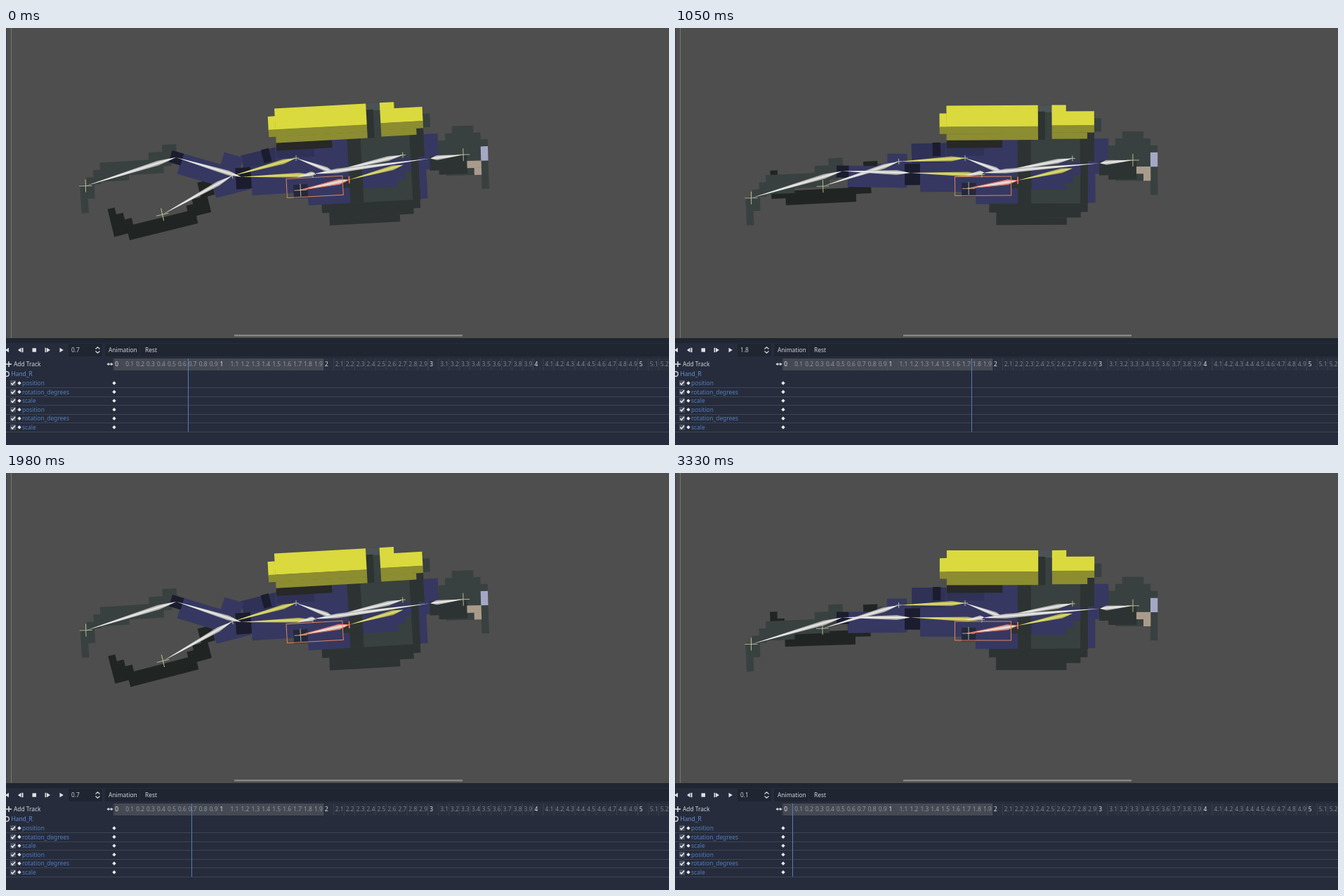
These frames come from a looping animation (944 px wide and 593 px high, 3360 ms). An HTML page with a canvas:

```html
<!DOCTYPE html>
<html lang="en">
<head>
<meta charset="utf-8">
<title>Skeleton animation editor</title>
<style>
html, body { margin: 0; width: 100%; height: 100%; overflow: hidden; background: #4d4e4d; }
canvas { display: block; width: 944px; height: 593px; }
</style>
</head>
<body>
<canvas id="stage" width="944" height="593"></canvas>
<script>
const g = document.getElementById('stage').getContext('2d');
const LOOP = 3360, RAD = Math.PI / 180, CELL = 10;
const FONT = '"Noto Sans", "Open Sans", sans-serif';
const C = {
  bg: '#4d4e4d', purple: '#363861', dusk: '#2f3156', night: '#1b1c2e',
  slate: '#38413f', dark: '#2d3332', black: '#202423', lime: '#dada3e',
  olive: '#8c8c31', skin: '#a99b8c', lilac: '#a5a8c4',
  panel: '#262c3b', deep: '#1f2531', blue: '#547cc0', icon: '#e0e1e4'
};

function rect(color, x0, y0, x1, y1) {
  g.fillStyle = color;
  g.fillRect(x0, y0, x1 - x0, y1 - y0);
}

// A block of sprite pixels, in cells; the small bleed hides seams when turned.
function box(color, x, y, w, h) {
  g.fillStyle = color;
  g.fillRect(x * CELL, y * CELL, w * CELL + 0.3, h * CELL + 0.3);
}

function path(...p) {
  g.beginPath();
  for (let i = 0; i < p.length; i += 2) g.lineTo(p[i], p[i + 1]);
}

function fill(color, ...p) {
  path(...p);
  g.fillStyle = color;
  g.fill();
}

function line(color, w, ...p) {
  path(...p);
  g.strokeStyle = color;
  g.lineWidth = w;
  g.stroke();
}

function text(s, x, y, color) {
  g.font = '8.4px ' + FONT;
  g.fillStyle = color;
  g.fillText(s, x, y + 3);
}

// Draws a part around a joint; ox, oy shift its grid in cells.
function place([x, y], deg, draw, ox = 0, oy = 0) {
  g.save();
  g.translate(x, y);
  g.rotate(deg * RAD);
  g.translate(ox * CELL, oy * CELL);
  draw();
  g.restore();
}

// Limb angles are measured downwards from the leftward direction.
function reach([x, y], len, deg) {
  return [x - len * Math.cos(deg * RAD), y + len * Math.sin(deg * RAD)];
}

// Kite with its widest point a fifth along, bright spine and shaded sides.
function bone(a, b, mid = '#efefed', side = '#91918f', outline) {
  const dx = b[0] - a[0], dy = b[1] - a[1], len = Math.hypot(dx, dy), half = 3.5;
  g.save();
  g.translate(a[0], a[1]);
  g.rotate(Math.atan2(dy, dx));
  const shade = g.createLinearGradient(0, -half, 0, half);
  shade.addColorStop(0, side);
  shade.addColorStop(0.5, mid);
  shade.addColorStop(1, side);
  fill(shade, 0, 0, len / 5, -half, len, 0, len / 5, half);
  if (outline) {
    g.closePath();
    g.strokeStyle = outline;
    g.lineWidth = 1;
    g.stroke();
  }
  g.restore();
}

const yellowBone = (a, b) => bone(a, b, '#e2e070', '#97954c');

function cross(p, deg, r) {
  place(p, deg, () => {
    line('#d6c8a8', 0.8, -r, 0, r, 0);
    line('#cfd9a8', 0.8, 0, -r, 0, r);
  });
}

function rightShin() {
  for (let i = 0; i < 3; i++) box(C.black, i, i, 1, 4 - i);
  box(C.black, 2, 3, 10, 2);
  box(C.black, 11, 2.2, 1, 2);
  box(C.black, 12, 1.5, 2.2, 2.4);
  box(C.black, 13.3, -0.6, 2, 2.2);
  box(C.purple, 15.4, -0.2, 5, 2.3);
}

function rightThigh() {
  box(C.dusk, -7.6, -2.2, 5, 4.2);
  box(C.dusk, -2.8, -1.5, 2.8, 3.5);
  box(C.night, -4.6, -2.3, 1.1, 1.9);
}

function leftFoot() {
  for (let i = 0; i < 3; i++) box(C.slate, -12 - i, 3 + i, 1, 2 + i);
  box(C.slate, -11, 2, 4, 2.7);
  box(C.slate, -7, 2, 5, 2);
  box(C.slate, -4, 1, 3.2, 2);
  box(C.slate, -2, 0, 2, 2);
}

function leftShin() {
  box(C.purple, 0.8, -0.8, 8.4, 3);
  box(C.purple, 6.4, -2.6, 2.8, 3);
  box(C.night, -0.8, -0.8, 1.7, 1.7);
}

function leftThigh() {
  box(C.night, -11, -1.6, 2.2, 3);
  box(C.purple, -8.8, -1.7, 9, 4.1);
}

function torso() {
  box(C.purple, 0.8, 5.5, 10.5, 4.7);
  box(C.purple, 8.9, 4.8, 2.4, 2.5);
  box(C.dusk, 1, 5.8, 5.3, 1.3);
  box(C.purple, 5.1, 10, 6.2, 4);
  // vest
  box(C.dark, 11.1, 4.8, 2, 9.2);
  box(C.slate, 13, 4.7, 7.1, 9.3);
  box(C.dark, 20, 3.9, 2, 4.2);
  box(C.dark, 20, 8, 1.1, 6);
  box(C.purple, 22, 4.8, 2, 5);
  box(C.purple, 21.1, 8, 1, 5.9);
  box(C.dark, 7, 14, 14, 1.2);
  box(C.dark, 8, 15, 12, 1);
  box(C.dark, 8, 16, 10, 1);
  // tank
  box('#272827', 1, 4.9, 7.9, 1.1);
  box(C.slate, 14, 0, 2, 4.9);
  box('#4b5355', 14, 0, 2, 1);
  box(C.dark, 14, 0.9, 1, 4);
  box(C.slate, 22, 1.9, 1, 1.9);
  box(C.lime, 1, 0, 13, 3);
  box(C.lime, 0, 1.1, 1, 2);
  box(C.olive, 0, 3, 14, 1);
  box(C.olive, 1, 4, 13, 0.9);
  box(C.lime, 16, 0, 2, 1);
  box(C.lime, 16, 0.9, 6, 2);
  box(C.olive, 16, 2.9, 6, 1);
  box(C.olive, 16, 3.9, 5, 0.9);
  // near arm
  box(C.purple, 17, 8, 3, 1);
  for (let i = 0; i < 3; i++) box(C.purple, 13, 9 + i, 7 - i, 1);
  box(C.dark, 10.1, 10.3, 2.9, 1.5);
  box('#25283a', 3.1, 11, 2, 1.9);
}

function head() {
  box(C.slate, 2, 0, 3, 1);
  box(C.slate, 1, 1, 5, 6);
  box(C.slate, 0, 2, 1, 4.8);
  box(C.slate, 6, 2, 1, 7);
  box(C.dark, -1.3, 4.2, 2.4, 2);
  box(C.dark, 0, 4.2, 4, 2.6);
  box(C.lilac, 6, 3, 1, 2);
  box(C.skin, 4, 5, 2, 1);
  box(C.skin, 5, 6, 1, 1);
}

// e runs from 0 (stretched) to 1 (kicked).
function figure(e) {
  const swing = (from, by) => from + by * e;
  const thighL = swing(-1.8, 4.4), shinL = swing(0.5, -21.1), footL = swing(16.3, 1.5);
  const thighR = swing(1.4, 17.4), shinR = swing(16.6, 15.3);
  const hipL = [437, 208.5], hipR = [413, 185];
  const kneeL = reach(hipL, 102, thighL), ankleL = reach(kneeL, 97, shinL);
  const toeL = reach(ankleL, 135, footL);
  const kneeR = reach(hipR, 94.5, thighR), ankleR = reach(kneeR, 113.5, shinR);

  place(ankleR, 15.1 - shinR, rightShin, -7.4, -2.6);
  place(hipR, 1.8 - thighR, rightThigh);
  place(ankleL, 14 - footL, leftFoot, 0.1, -1.9);
  place(ankleL, -0.6 - shinL, leftShin);
  place(hipL, -1.7 - thighL, leftThigh);

  const spine = [466, 204], tilt = -3.8 * e, nod = 1.7 * e;
  place(spine, tilt, torso, -8.9, -9.4);

  // Joints below are in stage units, carried along by the body.
  const shoulder = [566, 186], neck = [605, 193], elbow = [488, 217], hand = [416, 228];
  const carry = draw => place(spine, tilt, draw, -spine[0] / CELL, -spine[1] / CELL);
  carry(() => place(neck, nod, head, 1.2, -4.5));

  yellowBone(hipR, kneeR);
  yellowBone(hipL, kneeL);
  bone(kneeR, ankleR);
  bone(kneeL, ankleL);
  bone(ankleL, toeL);
  bone([467, 205], hipR);
  carry(() => {
    bone(shoulder, [460, 205]);
    bone([438, 206], neck);
    bone([440, 205], [414, 209]);
    yellowBone([566, 200], elbow);
    bone(elbow, hand, '#f0e6e2', '#b98d85', '#e06a5a');
    g.strokeStyle = '#e0855c';
    g.lineWidth = 1;
    g.strokeRect(398.5, 211, 80, 27);
    cross([418, 228], 0, 9);
    cross(shoulder, 0, 4);
    line('#ee7a68', 1.6, 488, 212, 488, 222);
    place(neck, nod, () => {
      bone([0, 0], [47, -4]);
      cross([47, -4], 0, 9);
    });
  });
  cross(hipR, 0, 4);
  cross(hipL, 0, 4);
  cross(kneeR, -thighR, 4);
  cross(toeL, 16 - footL, 9);
  cross(ankleR, 16 - shinR, 9);
}

function diamond(x, y, r = 2.7) {
  fill('#e9eaec', x, y - r, x + r, y, x, y + r, x - r, y);
}

// Triangle with its base at x and its tip at x + w.
const arrow = (x, y, w, r = 3.2) => fill(C.icon, x, y - r, x + w, y, x, y + r);

const tickX = s => 153 + 149.3 * s;

function toolbar(pos) {
  const y = 458;
  rect(C.deep, 0, 441, 944, 448);
  rect(C.panel, 0, 448, 944, 593);
  rect(C.deep, 89, 449, 137, 467);
  rect(C.deep, 141, 449, 190, 467);
  rect(C.deep, 191, 449, 944, 467);
  arrow(4, y, -5);
  arrow(21.5, y, -4.5);
  rect(C.icon, 22.5, y - 3.2, 24.5, y + 3.2);
  rect(C.icon, 37.5, y - 2.7, 43, y + 2.7);
  rect(C.icon, 55.5, y - 3.2, 57.2, y + 3.2);
  arrow(58, y, 5);
  arrow(76.5, y, 5.3);
  for (const d of [-1, 1]) {
    line(C.icon, 1.1, 127.5, y + 1.5 * d, 130.5, y + 4.2 * d, 133.5, y + 1.5 * d);
  }
  text(pos.toFixed(1), 93, y, '#c9ccd2');
  text('Animation', 146, y, '#d3d5da');
  text('Rest', 198, y, '#d3d5da');
}

function ruler() {
  const y = 478;
  rect('#2a303e', 154, 470, 944, 487);
  rect('#454953', 154, 470, 452, 487);
  for (let i = 0; i < 53; i++) {
    const x = tickX(i / 10), whole = i % 10 === 0;
    line(whole ? '#596070' : '#4b515e', 0.5, x, 470, x, 487);
    text((i / 10).toFixed(whole ? 0 : 1), x + 2.3, y,
      whole ? '#e3e5e9' : i < 20 ? '#92969e' : '#7c828e');
  }
  line(C.icon, 1.5, 0, y, 8, y);
  line(C.icon, 1.5, 4, y - 4, 4, y + 4);
  text('Add Track', 11, y, '#d3d5da');
  line(C.icon, 1.2, 145, y, 151, y);
  arrow(146.5, y, -3, 2.2);
  arrow(149.5, y, 3, 2.2);
}

function tracks() {
  g.strokeStyle = C.icon;
  g.lineWidth = 1.3;
  g.beginPath();
  g.arc(1, 492, 3.3, 0, 7);
  g.stroke();
  text('Hand_R', 7.5, 492, '#6690d6');
  const names = ['position', 'rotation_degrees', 'scale'];
  for (let i = 0; i < 6; i++) {
    const y = 505 + 12.55 * i, base = Math.round(y + 6);
    rect('#3d4453', 0, base, 944, base + 1);
    rect('#4b5160', 6, y - 4, 14, y + 4);
    line('#f0f1f3', 1.5, 7.4, y, 9.2, y + 2.2, 13, y - 2.2);
    diamond(19, y);
    text(names[i % 3], 23, y, C.blue);
    diamond(154, y);
  }
}

// Steps shown by time t: every 50 ms, with two 30 ms steps in each twelve.
function stepAt(t) {
  if (t < 30) return 0;
  const span = 557.5, round = Math.floor((t - 30) / span);
  const rest = t - 30 - round * span + 5;
  const startOf = i => 50 * i - 20 * (i > 2) - 20 * (i > 6);
  let i = 0;
  while (i < 11 && startOf(i + 1) <= rest) i++;
  return Math.min(72, round * 12 + i + 1);
}

function draw(now) {
  const n = stepAt(now % LOOP);
  const pos = (0.713 + 0.0476 * n - 8.3e-6 * n * n) % 2;
  rect(C.bg, 0, 0, 944, 593);
  line('#3b404a', 1, 0.5, 0, 0.5, 441);
  line('#777970', 1, 7.5, 0, 7.5, 441);
  figure((1 - Math.cos(Math.PI * pos)) / 2);
  rect('#858685', 325, 436, 650, 438.5);
  toolbar(pos);
  ruler();
  tracks();
  const x = Math.floor(tickX(pos)) + 0.5;
  line('#587cbc', 1, x, 470, x, 574);
}

const start = performance.now();
function tick() {
  draw(performance.now() - start);
  requestAnimationFrame(tick);
}
tick();
</script>
</body>
</html>
```
